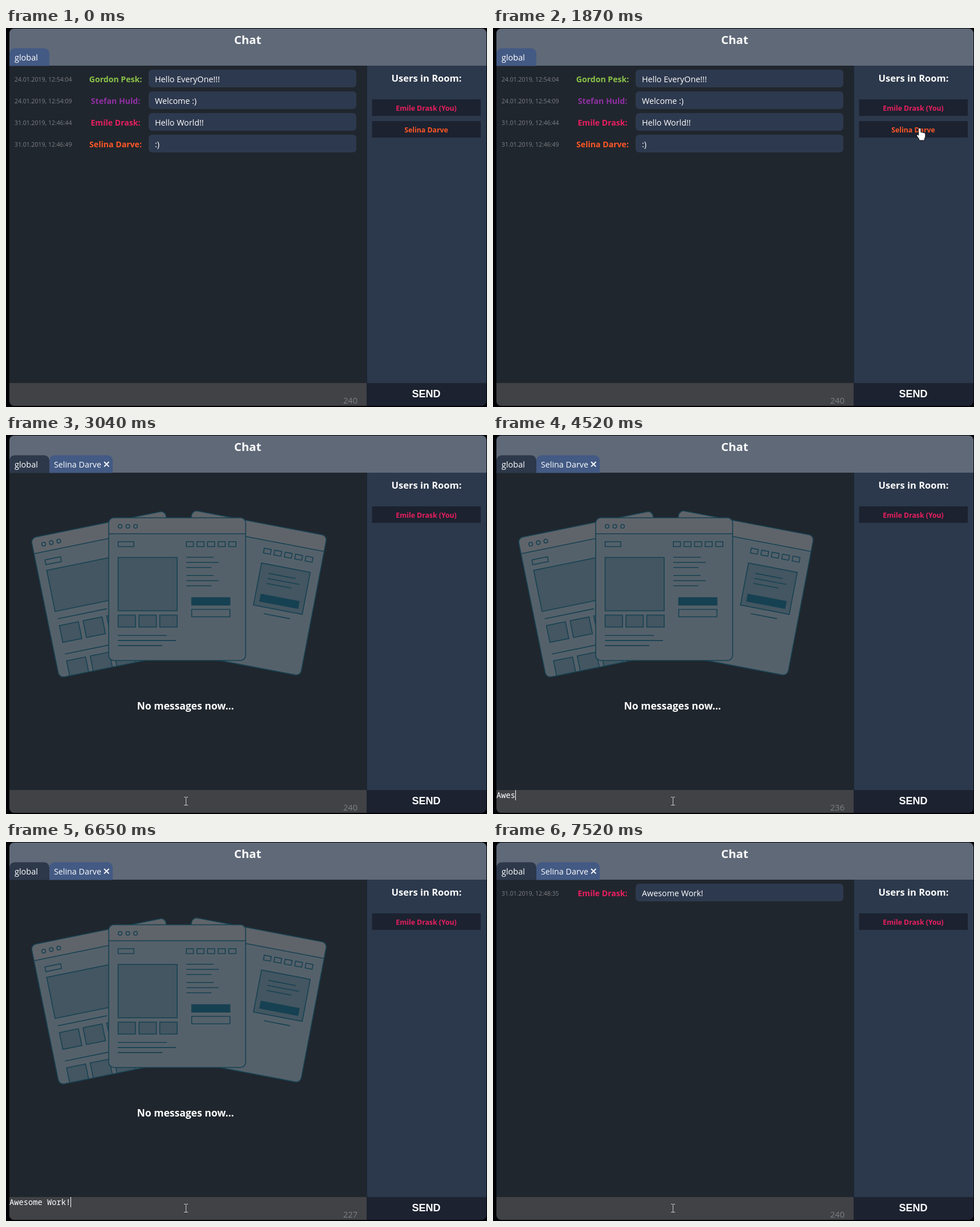
An HTML page with a canvas that plays this animation: 843x664 px, repeating every 8000 ms.

```html
<!DOCTYPE html>
<html lang="en">
<head>
<meta charset="utf-8">
<title>Chat</title>
<style>
  html, body { margin: 0; width: 100%; height: 100%; overflow: hidden; background: #010105; }
  canvas { display: block; }
</style>
</head>
<body>
<canvas id="stage" width="843" height="664"></canvas>
<script>
const LOOP = 8000;
const ctx = document.getElementById('stage').getContext('2d');
const SANS = '"Open Sans", "Noto Sans", sans-serif';
const MONO = '"Noto Sans Mono", "DejaVu Sans Mono", monospace';
const ARIAL = '"Liberation Sans", Arial, sans-serif';

const C = {
  header: '#5f6978', tabOn: '#435a84', tabOff: '#2d384a', room: '#20262d',
  side: '#2c394c', item: '#1c2230', bubble: '#2d394e', input: '#414246',
  dim: '#7e8085', page: '#55616a', bar: '#5f646a', pic: '#435661', ink: '#164152'
};
const PINK = '#e91e5f', ORANGE = '#ff5726', GREEN = '#8bc34a', PURPLE = '#9030a4';
const ME = 'Emile Drask', FRIEND = 'Selina Darve';

const GLOBAL = [
  ['24.01.2019, 12:54:04', 'Gordon Pesk', GREEN, 'Hello EveryOne!!!'],
  ['24.01.2019, 12:54:09', 'Stefan Huld', PURPLE, 'Welcome :)'],
  ['31.01.2019, 12:46:44', ME, PINK, 'Hello World!!'],
  ['31.01.2019, 12:46:49', FRIEND, ORANGE, ':)']
];
const REPLY = ['31.01.2019, 12:48:35', ME, PINK, 'Awesome Work!'];

const T = { open: 2220, art: 2700, focus: 3300, send: 7030 };
const KEYS = [3810, 4090, 4240, 4520, 4600, 4780, 4880, 4980, 5160, 5260, 5490, 5540, 6650];

function box(x, y, w, h, fill, r = 0) {
  ctx.beginPath();
  ctx.roundRect(x, y, w, h, r);
  ctx.fillStyle = fill;
  ctx.fill();
}

function text(s, x, y, size, { color = '#fff', weight = 400, align = 'left', family = SANS } = {}) {
  ctx.font = `${weight} ${size}px ${family}`;
  ctx.textAlign = align;
  ctx.fillStyle = color;
  ctx.fillText(s, x, y);
}

function bold(s, x, y, size, color) {
  text(s, x, y, size, { weight: 700, align: 'center', color });
}

function message([time, name, color, body], i) {
  const y = 73 + i * 38;
  text(time, 15, y + 20.5, 10.5, { color: C.dim });
  bold(name + ':', 192, y + 21.5, 14.1, color);
  box(250, y, 364, 31, C.bubble, 6);
  text(body, 261, y + 21.5, 14.3);
}

function user(name, color, i) {
  const y = 125 + i * 38;
  box(641.5, y, 190.5, 29, C.item);
  bold(name, 736.5, y + 19.5, 12.25, color);
}

// Illustration of three browser windows
function shape(x, y, w, h, fill) {
  ctx.beginPath();
  ctx.rect(x, y, w, h);
  if (fill) { ctx.fillStyle = fill; ctx.fill(); }
  ctx.stroke();
}

function rule(x1, y, x2) {
  ctx.beginPath();
  ctx.moveTo(x1, y);
  ctx.lineTo(x2, y);
  ctx.stroke();
}

function nav() {
  for (let i = 0; i < 5; i++) shape(136 + i * 18.6, 42, 12.5, 8.5);
}

function dots() {
  for (let i = 0; i < 3; i++) {
    ctx.beginPath();
    ctx.arc(20 + i * 13.5, 15, 3.3, 0, Math.PI * 2);
    ctx.stroke();
  }
}

function browser(x, y, degrees, content) {
  ctx.save();
  ctx.translate(x, y);
  ctx.rotate(degrees * Math.PI / 180);
  ctx.strokeStyle = C.ink;
  ctx.lineWidth = 1.6;
  ctx.save();
  ctx.beginPath();
  ctx.roundRect(0, 0, 240, 250, 9);
  ctx.clip();
  box(0, 0, 240, 250, C.page);
  box(0, 0, 240, 28, C.bar);
  rule(0, 28, 240);
  content();
  ctx.restore();
  ctx.beginPath();
  ctx.roundRect(0, 0, 240, 250, 9);
  ctx.stroke();
  ctx.restore();
}

function gallery() {
  dots();
  shape(16.5, 42.5, 28, 8.5);
  shape(16, 61, 208, 73.5, C.pic);
  for (const y of [148, 211]) {
    rule(18, y, 106);
    for (let i = 0; i < 4; i++) shape(18.5 + i * 42.3, y + 12.3, 34, 30, C.pic);
  }
}

function card() {
  nav();
  shape(136, 68.5, 87, 75, C.pic);
  rule(151.5, 84, 200);
  rule(151.5, 93, 208);
  rule(151.5, 102, 195.5);
  shape(145.5, 122.3, 68, 12.5, C.ink);
  rule(156.5, 155, 203.5);
}

function article() {
  dots();
  nav();
  shape(16.5, 42, 27.5, 8.5);
  shape(16.5, 69.5, 103.5, 93.5, C.pic);
  for (let i = 0; i < 3; i++) {
    shape(16.5 + i * 36.5, 170.5, 30.5, 21, C.pic);
    rule(16, 206.3 + i * 8.8, [102, 118, 94][i]);
    for (const y of [69.3, 101.3]) rule(136, y + i * 9, [184, 193, 180][i]);
  }
  shape(145.5, 140, 67, 13, C.ink);
  shape(145.5, 160.5, 67, 13);
}

function art() {
  browser(43.5, 180.5, -11.5, gallery);
  browser(327, 131.5, 10.8, card);
  browser(180, 145, 0, article);
}

// Mouse pointer
const ARROW = new Path2D('M0 0V15.6L3.5 12.3 6 18 8.5 17 6.1 11.4H10.8Z');
const HAND = new Path2D(
  'M-.8 2Q-.8 .8 .8 .8T2.4 2V8Q3.6 7 5.2 8.4 6.6 7.6 7.8 9.2 10.4 8.6 10.4 11.4V15' +
  'Q10.2 17 9 18.6V21.6H.2V19.6L-3.6 14.6Q-4.8 12.4-3 12.2-2 12.2-.8 13.8Z');

function glyph(path, x, y) {
  ctx.save();
  ctx.translate(x, y);
  ctx.lineJoin = 'round';
  ctx.lineWidth = 1.6;
  ctx.strokeStyle = '#000';
  ctx.stroke(path);
  ctx.fillStyle = '#fff';
  ctx.fill(path);
  ctx.restore();
}

function beam(x, y) {
  ctx.fillStyle = '#c9cacc';
  ctx.fillRect(x, y - 7, 1, 14);
  for (const edge of [y - 8, y + 6]) {
    ctx.fillRect(x - 3, edge, 3, 1);
    ctx.fillRect(x + 1, edge, 3, 1);
  }
}

function ring(x, y) {
  ctx.lineWidth = 1;
  [['#000', 10.5], ['#fff', 9.5]].forEach(([color, r]) => {
    ctx.beginPath();
    ctx.arc(x, y, r, 0, Math.PI * 2);
    ctx.strokeStyle = color;
    ctx.stroke();
  });
}

// Points are [step, x, y]; the pointer is sampled about every 47 ms
function along(points, step) {
  let i = 1;
  while (i < points.length - 1 && step > points[i][0]) i++;
  const [s0, x0, y0] = points[i - 1], [s1, x1, y1] = points[i];
  const k = Math.min(1, (step - s0) / (s1 - s0));
  return [x0 + (x1 - x0) * k, y0 + (y1 - y0) * k];
}

const ENTER = [[0, 712, 648], [3, 728, 450], [6, 745, 270], [9, 752, 185], [11, 750, 160]];
const LEAVE = [[0, 700, 203], [2, 547, 323], [5, 400, 500], [8, 328, 612], [12, 315, 642]];

function pointer(t) {
  if (t < 260) return;
  if (t < 1000) {
    glyph(ARROW, ...along(ENTER, Math.floor((t - 260) / 46.3)));
  } else if (t < 2480) {
    const y = t < 1050 ? 169 : 175;
    glyph(HAND, 747, y);
    if (t >= 1790 && t < 1870) ring(746.5, 175);
  } else {
    const [x, y] = along(LEAVE, Math.floor((t - 2480) / 46.6));
    if (y < 622) glyph(ARROW, x, y);
    else beam(Math.round(x), Math.round(y));
    if (t >= T.focus && t < 3400) ring(315, 642);
  }
}

function tabs(priv) {
  box(6, 35.5, 70, 31, priv ? C.tabOff : C.tabOn, [9, 9, 0, 0]);
  text('global', 15, 56.5, 14.5);
  if (!priv) return;
  box(76, 35.5, 111, 31, C.tabOn, [9, 9, 0, 0]);
  text(FRIEND, 84, 56.5, 14.3);
  ctx.strokeStyle = '#fff';
  ctx.lineWidth = 1.9;
  ctx.beginPath();
  ctx.moveTo(172, 47);
  ctx.lineTo(180.4, 55.4);
  ctx.moveTo(180.4, 47);
  ctx.lineTo(172, 55.4);
  ctx.stroke();
}

function room(t) {
  if (t < T.open) {
    GLOBAL.forEach(message);
  } else if (t < T.send) {
    const loaded = t >= T.art;
    if (loaded) art();
    bold('No messages now...', 314.5, loaded ? 480.5 : 86.5, 17.5);
  } else {
    message(REPLY, 0);
  }
}

function caretOn(t) {
  return t >= T.focus && !(t >= 6090 && t < 6600) && t < 7520;
}

function input(t) {
  const typed = t < T.send ? KEYS.filter(k => t >= k).length : 0;
  text(REPLY[3].slice(0, typed), 6, 636, 13.75, { family: MONO });
  text(String(240 - typed), 616, 657.5, 14.6, { color: C.dim, align: 'right' });
  if (caretOn(t)) box(Math.floor(6 + typed * 8.25), 622, 1, 18, '#fff');
}

function draw(t) {
  const priv = t >= T.open;
  ctx.fillStyle = '#010105';
  ctx.fillRect(0, 0, 843, 664);
  ctx.save();
  ctx.beginPath();
  ctx.roundRect(6, 1, 836, 661, 8);
  ctx.clip();
  box(6, 1, 836, 65, C.header);
  box(6, 66, 626.5, 556, C.room);
  box(632.5, 66, 209.5, 556, C.side);
  box(6, 622, 626.5, 40, C.input);
  box(632.5, 622, 209.5, 40, C.item);
  bold('Chat', 423.5, 27.5, 20.4);
  tabs(priv);
  room(t);
  bold('Users in Room:', 737, 93.5, 16.5);
  user(ME + ' (You)', PINK, 0);
  if (!priv) user(FRIEND, ORANGE, 1);
  input(t);
  text('SEND', 736.5, 647, 18, { weight: 700, align: 'center', family: ARIAL });
  ctx.restore();
  pointer(t);
}

function tick(now) {
  draw(now % LOOP);
  requestAnimationFrame(tick);
}
requestAnimationFrame(tick);
</script>
</body>
</html>
```
